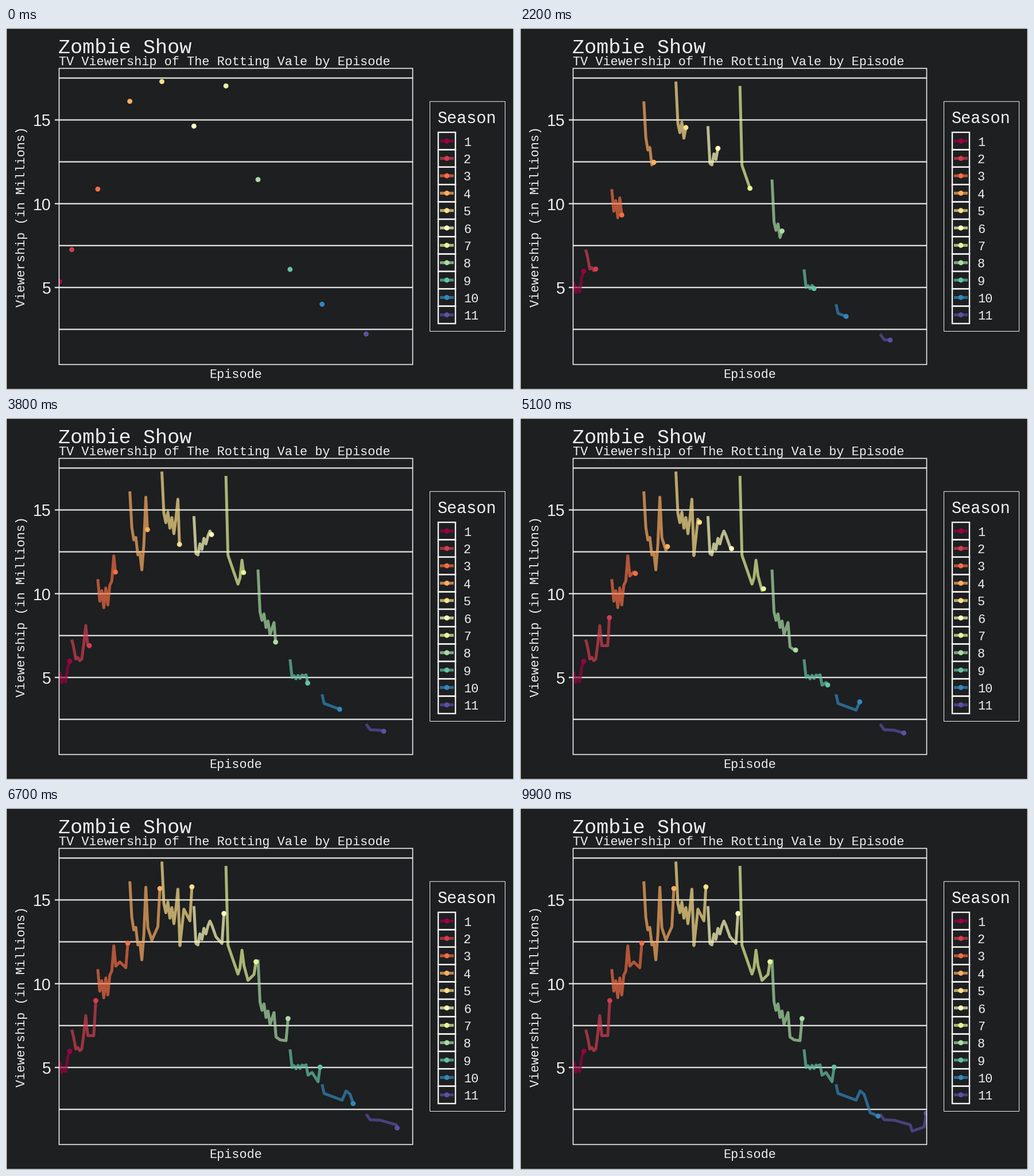
Recreate the animation shown at these times as a matplotlib script. Size 885 px wide and 632 px high, loop 10000 ms.

```python
import numpy as np
import matplotlib.pyplot as plt
from matplotlib.animation import FuncAnimation
from matplotlib.patches import Rectangle

plt.rcParams["path.snap"] = False

W, H, DPI = 885, 632, 128
PX = 72 / DPI                      # points per pixel
FRAMES, INTERVAL = 100, 100
LONGEST = 24                       # episodes in the longest season
BG, INK, GRID = "#1d1f21", "#f2f2f2", "#dcdcdc"
LEFT, RIGHT, TOP, BOTTOM = 92.5, 708.5, 70.5, 587.5
COLORS = plt.colormaps["Spectral"](np.linspace(0, 1, 11))

fig = plt.figure(figsize=(W / DPI, H / DPI), dpi=DPI, facecolor=BG)
ax = fig.add_axes([0, 0, 1, 1])
ax.set(xlim=(0, W), ylim=(H, 0))
ax.axis("off")


def x_px(episode):
    return 93.6 + 3.489 * episode


def y_px(millions):
    return 599.25 - 29.25 * millions


def text(x, y, s, size, family="Liberation Mono", **kw):
    return ax.text(x, y, s, fontsize=size * PX, family=family, color=INK,
                   va="baseline", **kw)


def box(x0, y0, x1, y1, lw, z=1):
    rect = Rectangle((x0, y0), x1 - x0, y1 - y0, fill=False,
                     ec=INK, lw=lw * PX, zorder=z)
    return ax.add_patch(rect)


def stroke(xs, ys, color, lw, z=2, alpha=1):
    return ax.plot(xs, ys, color=color, lw=lw * PX, alpha=alpha, zorder=z,
                   solid_capstyle="butt", solid_joinstyle="round")[0]


def dots(xy, colors):
    return ax.scatter(*np.transpose(xy), s=(8.8 * PX) ** 2, c=colors,
                      linewidths=0, zorder=4)


# frame, grid and axes
box(0.5, 0.5, W - 0.5, H - 1, 1.5)
for v in np.arange(2.5, 18, 2.5):
    stroke([LEFT, RIGHT], [y_px(v)] * 2, GRID, 2.4, z=1)
for v in (5, 10, 15):
    stroke([85, LEFT], [y_px(v)] * 2, GRID, 2.4, z=1)
    text(78.5, y_px(v) + 10.8, str(v), 28.6, "Liberation Sans", ha="right")
panel = box(LEFT, TOP, RIGHT, BOTTOM, 1.6, z=5)

text(91, 44, "Zombie Show", 35.1)
text(91.5, 65, "TV Viewership of The Rotting Vale by Episode", 21.9)
text(400.5, 611, "Episode", 21.9, ha="center")
text(33, 329.5, "Viewership (in Millions)", 21.9, ha="center",
     rotation=90, rotation_mode="anchor")

# legend
box(738.5, 128.3, 869.5, 529.5, 1)
text(752, 166.3, "Season", 28.5)
key_y = 197.3 + 30.35 * np.arange(11)
for i, y in enumerate(key_y):
    box(753, y - 15.2, 783, y + 15.2, 2.4)
    stroke([756, 780], [y, y], COLORS[i], 5, alpha=0.7)
    text(797, y + 8.5, str(i + 1), 21.9)
dots([(768, y) for y in key_y], COLORS)

# turning points shared by the regular seasons: premiere, drop,
# autumn low, return, slump, spring low, penultimate, finale
BEATS = (0, 1, 6.5, 8, 9, 11, 14, 15)
seasons = []


def add_season(zigzag, *levels, beats=BEATS):
    """Straight runs between beats; early episodes alternate around them."""
    ep = np.arange(beats[-1] + 1)
    early = (ep < 7) & ~np.isin(ep, beats)
    views = np.interp(ep, beats, levels) + zigzag * early * (-1.0) ** ep
    start = sum(len(s["ep"]) for s in seasons)
    line = stroke([], [], COLORS[len(seasons)], 5, z=3, alpha=0.7)
    line.set_clip_path(panel)
    seasons.append(dict(ep=ep, start=start, views=views, line=line))


add_season(0.25, 5.35, 4.7, 4.75, 5.97, beats=(0, 1, 3, 5))
add_season(-0.1, 7.26, 6.1, 6.1, 8.1, 6.9, 6.9, 8.99,
           beats=(0, 2, 5, 7, 8, 11, 12))
add_season(0.55, 10.87, 9.55, 10, 12.26, 11.05, 11.3, 10.95, 12.42)
add_season(-0.3, 16.11, 13.95, 11.5, 15.76, 13.34, 12.6, 13.4, 15.68)
add_season(-0.4, 17.29, 14.8, 13.9, 15.64, 12.27, 14.45, 13.75, 15.78)
add_season(-0.25, 14.63, 12.4, 13.3, 13.74, 13.48, 12.8, 12.4, 14.19)
add_season(0, 17.03, 12.3, 10.4, 12, 11.08, 10.2, 10.55, 11.31)
add_season(-0.3, 11.44, 8.92, 7.75, 8.28, 6.82, 6.65, 6.6, 7.92)
add_season(0.1, 6.08, 5, 5.05, 5.16, 4.54, 4.7, 4.15, 5.02)
add_season(0, 4, 3.45, 3.05, 3.6, 3.4, 2.3, 2.1,
           beats=(0, 1, 10, 12, 14, 17, 21))
add_season(0, 2.22, 1.88, 1.85, 1.58, 1.2, 1.45, 2.27,
           beats=(0, 2, 7, 15, 16, 22, 23))

heads = dots([(0, 0)] * len(seasons), COLORS)
heads.set_clip_path(panel)

# each episode lands on a whole frame
arrivals = np.rint(np.arange(LONGEST) * (FRAMES - 1) / (LONGEST - 1))


def update(frame):
    tips = []
    for s in seasons:
        ep = s["ep"]
        now = np.interp(frame, arrivals[:len(ep)], ep)
        shown = np.append(ep[ep < now], now)
        xs = x_px(s["start"] + shown)
        ys = y_px(np.interp(shown, ep, s["views"]))
        s["line"].set_data(xs, ys)
        tips.append((xs[-1], ys[-1]))
    heads.set_offsets(tips)
    return [s["line"] for s in seasons] + [heads]


anim = FuncAnimation(fig, update, frames=FRAMES, interval=INTERVAL,
                     repeat=True, repeat_delay=0, blit=False)
plt.show()
```
